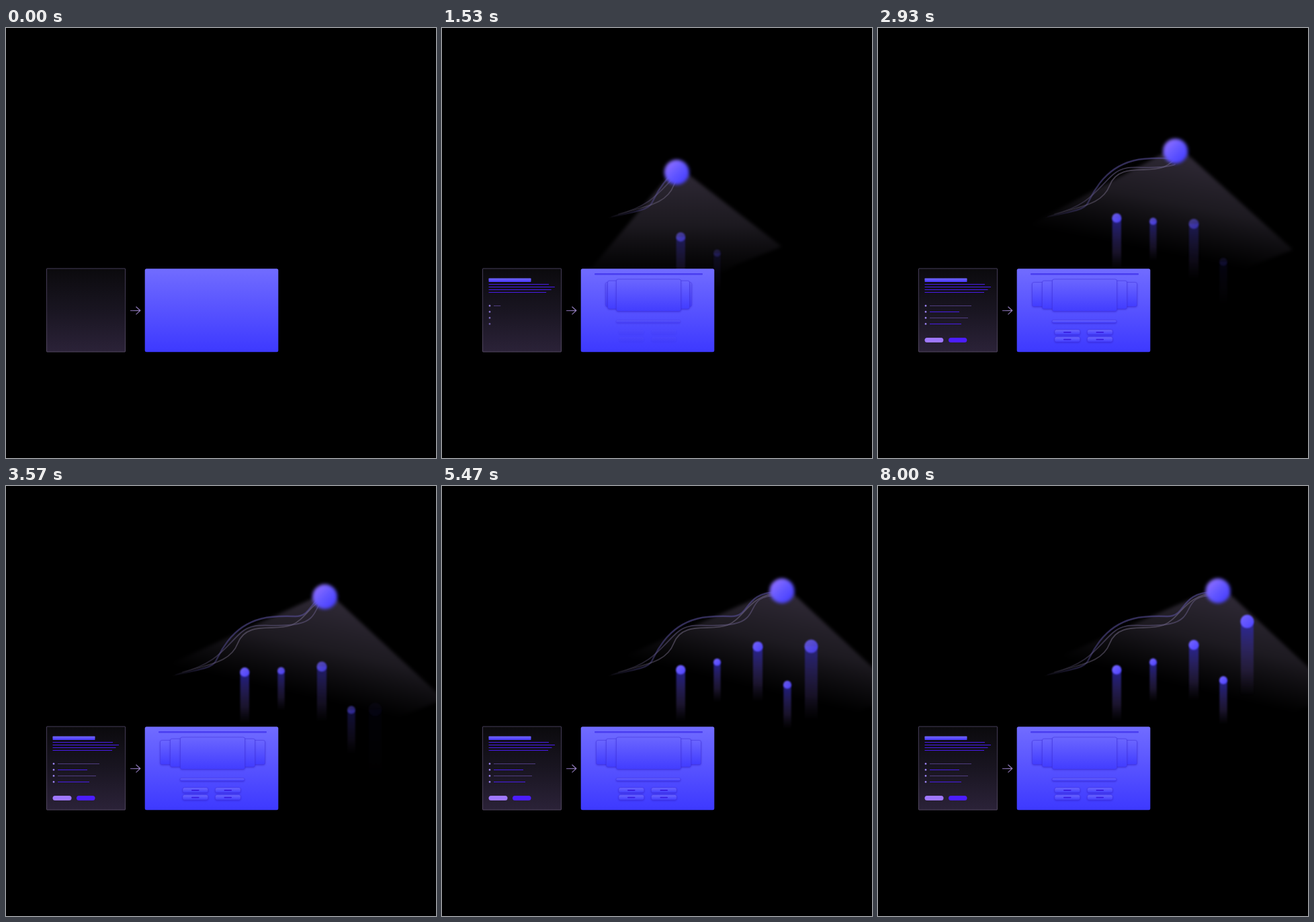
An HTML page with a canvas that plays this animation: 640x640 px, repeating every 8410 ms.

```html
<!DOCTYPE html>
<html lang="en">
<head>
<meta charset="utf-8">
<title>Page to growth</title>
<style>
  html, body { margin: 0; width: 100%; height: 100%; overflow: hidden; background: #000; }
  canvas { display: block; width: 100vw; height: 100vh; }
</style>
</head>
<body>
<canvas width="640" height="640"></canvas>
<svg width="0" height="0"><path id="route" d="M255 281C320 268 315 247 335 226S375 207 399 205S470 156 506 156"/></svg>
<script>
const ctx = document.querySelector('canvas').getContext('2d');
const route = document.getElementById('route');
const LOOP = 8410;
const clamp = v => Math.max(0, Math.min(1, v));
const easeOut = (t, start, duration = 1100, power = 3) =>
  1 - (1 - clamp((t - start) / duration)) ** power;

const trails = [
  { rgb: '92,82,160', width: 2.4, path: new Path2D('M252 281C330 265 300 270 330 231S400 193 430 194S448 158 500 158') },
  { rgb: '112,103,128', width: 1.8, path: new Path2D('M248 283C290 265 332 268 345 234S400 217 425 207S458 161 500 160') },
  { rgb: '100,90,130', width: 1.8, path: new Path2D('M262 277C315 265 328 237 350 218S395 213 435 205S450 162 500 163') }
];

// Markers rise one after another by `drop` and come to rest at `top`
const markers = [
  { x: 355.3, r: 7, top: 273.5, drop: 62 },
  { x: 409.5, r: 5.4, top: 262, drop: 73 },
  { x: 470, r: 7.5, top: 236.5, drop: 81 },
  { x: 514, r: 6, top: 289, drop: 59 },
  { x: 549.5, r: 10, top: 201.5, drop: 131 }
];

function gradient(x0, y0, x1, y1, ...colors) {
  const g = ctx.createLinearGradient(x0, y0, x1, y1);
  colors.forEach((c, i) => g.addColorStop(i / (colors.length - 1), c));
  return g;
}

function layer(alpha, blur, draw) {
  if (alpha <= 0) return;
  ctx.save();
  ctx.globalAlpha = alpha;
  if (blur) ctx.filter = `blur(${blur}px)`;
  draw();
  ctx.restore();
}

function box(x, y, w, h, r, fill, stroke) {
  if (w <= 0) return;
  ctx.beginPath();
  ctx.roundRect(x, y, w, h, Math.min(r, w / 2));
  ctx.fillStyle = fill;
  ctx.fill();
  if (stroke) {
    ctx.strokeStyle = stroke;
    ctx.lineWidth = 1;
    ctx.stroke();
  }
}

function disc(x, y, r, fill) {
  ctx.beginPath();
  ctx.arc(x, y, r, 0, 7);
  ctx.fillStyle = fill;
  ctx.fill();
}

// The cone opens and leans to the left as the orb travels
function drawBeam(t, x, y, travel) {
  const swing = (1 - travel) ** 2, rad = Math.PI / 180;
  const right = (43 - 15 * swing) * rad, left = (157.3 - 76 * swing) * rad;
  const reach = 235 - 130 * swing, tilt = 0.69 * swing - 0.24;
  const tipX = x + 6 + reach * Math.cos(right), tipY = y - 6 + reach * Math.sin(right);
  const fade = 155 / (1 + tilt * tilt);
  layer(easeOut(t, 130, 1900), 2.5, () => {
    ctx.beginPath();
    ctx.moveTo(x - 4, y - 4);
    ctx.lineTo(x + 8, y - 4);
    ctx.lineTo(tipX, tipY);
    ctx.lineTo(tipX - 70, tipY + 28);
    ctx.lineTo(x, y + 190);
    ctx.lineTo(x + 290 * Math.cos(left), y + 290 * Math.sin(left));
    ctx.fillStyle = gradient(x, y, x + tilt * fade, y + fade,
      'rgb(48,42,55)', 'rgba(40,36,45,.72)', 'rgba(32,29,36,0)');
    ctx.fill();
  });
}

function drawTrails(t, x) {
  layer(easeOut(t, 130, 1500), 0.6, () => {
    ctx.beginPath();
    ctx.rect(0, 0, x, 640);
    ctx.clip();
    for (const { rgb, width, path } of trails) {
      ctx.lineWidth = width;
      ctx.strokeStyle = gradient(246, 0, 345, 0, `rgba(${rgb},0)`, `rgba(${rgb},.35)`, `rgba(${rgb},.55)`);
      ctx.stroke(path);
    }
  });
}

function drawMarker(t, { x, r, top, drop }, i) {
  const start = 840 + 775 * i;
  const y = top + drop * (1 - easeOut(t, start, 4460));
  const alpha = easeOut(t, start - 450, 4900);
  const width = r * 1.9, length = r * 11;
  layer(alpha, 0.8, () => {
    ctx.fillStyle = gradient(0, y, 0, y + length,
      'rgba(48,42,190,.75)', 'rgba(52,42,130,.68)', 'rgba(50,38,85,.55)', 'rgba(40,30,60,0)');
    ctx.fillRect(x - width / 2, y, width, length);
  });
  layer(alpha, 1.2, () => disc(x, y, r, gradient(x - r, y - r, x + r, y + r, '#7867ff', '#4c42ff')));
}

function drawOrb(t, x, y) {
  layer(easeOut(t, 130, 1400), 2.4, () =>
    disc(x, y, 18.5, gradient(x - 14, y - 13, x + 13, y + 14, '#8d6eff', '#6357ff', '#473eff')));
}

function drawDocument(t) {
  box(60.5, 358, 117, 124, 0.5,
    gradient(0, 358, 0, 482, '#0b0a0d', '#191521', '#2b2238'),
    gradient(0, 358, 0, 482, '#453d58', '#40384f', '#51475f'));

  box(69.5, 372.5, 63 * easeOut(t, 300), 5.5, 0.7, gradient(0, 372, 0, 378, '#736aff', '#4b38ff'));
  [89.5, 98.5, 94, 88.5].forEach((width, i) =>
    box(69.5, 381 + 4 * i, width * easeOut(t, 420 + i * 120), 1, 0, '#481cea'));

  [62, 44, 57, 47].forEach((width, i) => {
    const y = 413 + 9 * i;
    layer(easeOut(t, 930 + i * 100), 0, () => disc(71, y + 0.4, 1.35, '#9b83f0'));
    box(77, y, width * easeOut(t, 1467 + i * 120), 1, 0, i % 2 ? '#481cea' : '#4f3d80');
  });

  const grow = easeOut(t, 2030);
  layer(clamp(grow * 1.9), 0, () => {
    box(69.5, 461, 28 * grow, 7, 3.5, '#9f78ff');
    box(105, 461, 27.5 * grow, 7, 3.5, '#4c1dff');
  });
}

function drawArrow() {
  ctx.lineWidth = 1.3;
  ctx.strokeStyle = gradient(185, 0, 200, 0, '#6b5890', '#9680c2');
  ctx.stroke(new Path2D('M185 420.6H199.5M193.5 414.8L199.7 420.6L193.5 426.4'));
}

function drawPanel(left, right, top, bottom, alpha) {
  layer(alpha, 0, () => {
    ctx.shadowColor = 'rgba(38,20,190,.55)';
    ctx.shadowBlur = 3;
    ctx.shadowOffsetY = 1;
    box(left, top, right - left, bottom - top, 2.5, gradient(0, top, 0, bottom, '#6b66ff', '#423dff'));
    ctx.shadowColor = 'transparent';
    box(left, top, right - left, bottom - top, 2.5, 'transparent', 'rgba(66,52,222,.5)');
  });
}

function drawPage(t) {
  box(206.7, 358.2, 198.6, 124, 2.5, gradient(0, 358, 0, 482, '#716cff', '#3d39ff'));
  box(227, 365, 161 * easeOut(t, 200), 2.4, 1, '#493df0');

  // Carousel: the further a panel slides out, the smaller it is
  for (const step of [2, 1, 0]) {
    const slide = easeOut(t, step ? 720 + 280 * step : 300), spread = 15 * step * slide;
    drawPanel(259.5 - spread, 355.5 + spread, 374 + 2.3 * step, 421.5 - 3.5 * step, clamp(slide * 1.4));
  }

  drawPanel(259, 355, 434.8, 439, easeOut(t, 1330));
  for (const x of [263, 311.5]) {
    for (const y of [449, 459.7]) {
      drawPanel(x, x + 37.7, y, y + 7.6, easeOut(t, 1490));
      layer(easeOut(t, 1930), 0, () => box(x + 13, y + 3, 11.5, 1.8, 0.8, '#381ce0'));
    }
  }
}

function render(t) {
  ctx.clearRect(0, 0, 640, 640);
  const travel = easeOut(t, 130, 4300, 1.35);
  const { x, y } = route.getPointAtLength(travel * route.getTotalLength());
  drawBeam(t, x, y, travel);
  drawTrails(t, x);
  markers.forEach((marker, i) => drawMarker(t, marker, i));
  drawOrb(t, x, y);
  drawDocument(t);
  drawArrow();
  drawPage(t);
}

const started = performance.now();
function tick() {
  render((performance.now() - started) % LOOP);
  requestAnimationFrame(tick);
}
tick();
</script>
</body>
</html>
```
